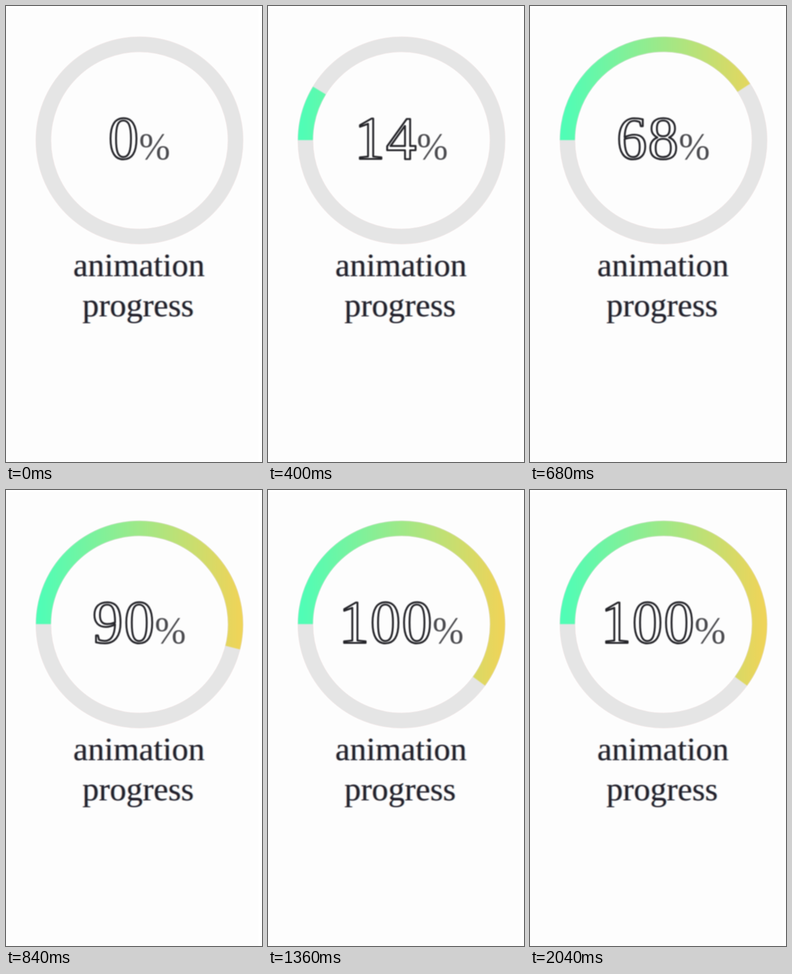
An HTML page that plays this animation: 561x999 px, repeating every 2080 ms.

```html
<!DOCTYPE html>
<html lang="en">
<head>
<meta charset="utf-8">
<title>Animation progress</title>
<style>
  html, body { margin: 0; width: 100%; height: 100%; overflow: hidden; background: #fff; }
  svg { display: block; width: 100%; height: 100%; }
  text { font-family: "Liberation Serif", "Times New Roman", serif; text-anchor: middle; }
  circle, #arc { fill: none; }
  #digits { font-size: 134px; letter-spacing: 2px; fill: #fff; stroke: #26262b; stroke-width: 4.2; stroke-linejoin: round; }
  #sign { font-size: 82px; fill: #4c4c50; }
  #caption { font-size: 72px; }
  .soft { filter: blur(.8px); }
</style>
</head>
<body>
<svg viewBox="0 0 561 999">
  <defs>
    <linearGradient id="sweep" gradientUnits="userSpaceOnUse" x1="75" y1="0" x2="510" y2="0">
      <stop offset="0" stop-color="#50fdb6"/>
      <stop offset="1" stop-color="#eed459"/>
    </linearGradient>
    <g id="caption">
      <text x="291.5" y="592">animation</text>
      <text x="289.5" y="680">progress</text>
    </g>
  </defs>
  <rect y="4" width="553" height="995" fill="#fdfdfd"/>
  <circle cx="292.5" cy="294.5" r="210.5" stroke="#f3ecec" stroke-width="35"/>
  <circle cx="292.5" cy="294.5" r="210.5" stroke="#e5e5e5" stroke-width="32"/>
  <g class="soft">
    <path id="arc" stroke="url(#sweep)" stroke-width="32.5"/>
  </g>
  <g class="soft">
    <text x="292" y="334.5"><tspan id="digits">0</tspan><tspan id="sign" dx="-1.5">%</tspan></text>
  </g>
  <!-- colour fringes around the caption -->
  <g class="soft">
    <use href="#caption" x="-1.8" fill="#f0a060" opacity=".55"/>
    <use href="#caption" x="1.8" fill="#60b8f0" opacity=".55"/>
    <use href="#caption" fill="#24222e"/>
  </g>
</svg>
<script>
  const LOOP = 2080, STEP = 40;
  const DELAY = 12, DURATION = 1175;
  const CENTER = { x: 292.5, y: 294.5 }, RADIUS = 210.5;
  const START = 180.2, SWEEP = 216;

  const arc = document.getElementById("arc");
  const digits = document.getElementById("digits");

  const easeInOutCubic = x => x < 0.5 ? 4 * x ** 3 : 1 - 4 * (1 - x) ** 3;

  function point(degrees) {
    const a = degrees * Math.PI / 180;
    return `${CENTER.x + RADIUS * Math.cos(a)} ${CENTER.y + RADIUS * Math.sin(a)}`;
  }

  function draw(time) {
    const t = Math.floor((time % LOOP) / STEP) * STEP;
    const x = Math.min(1, Math.max(0, (t - DELAY) / DURATION));
    const progress = easeInOutCubic(x);
    const angle = SWEEP * progress;
    const large = angle > 180 ? 1 : 0;

    arc.setAttribute("d", progress > 0
      ? `M${point(START)}A${RADIUS} ${RADIUS} 0 ${large} 1 ${point(START + angle)}`
      : "");
    digits.textContent = Math.round(progress * 100);
  }

  const began = performance.now();
  function tick() {
    draw(performance.now() - began);
    requestAnimationFrame(tick);
  }
  tick();
</script>
</body>
</html>
```
